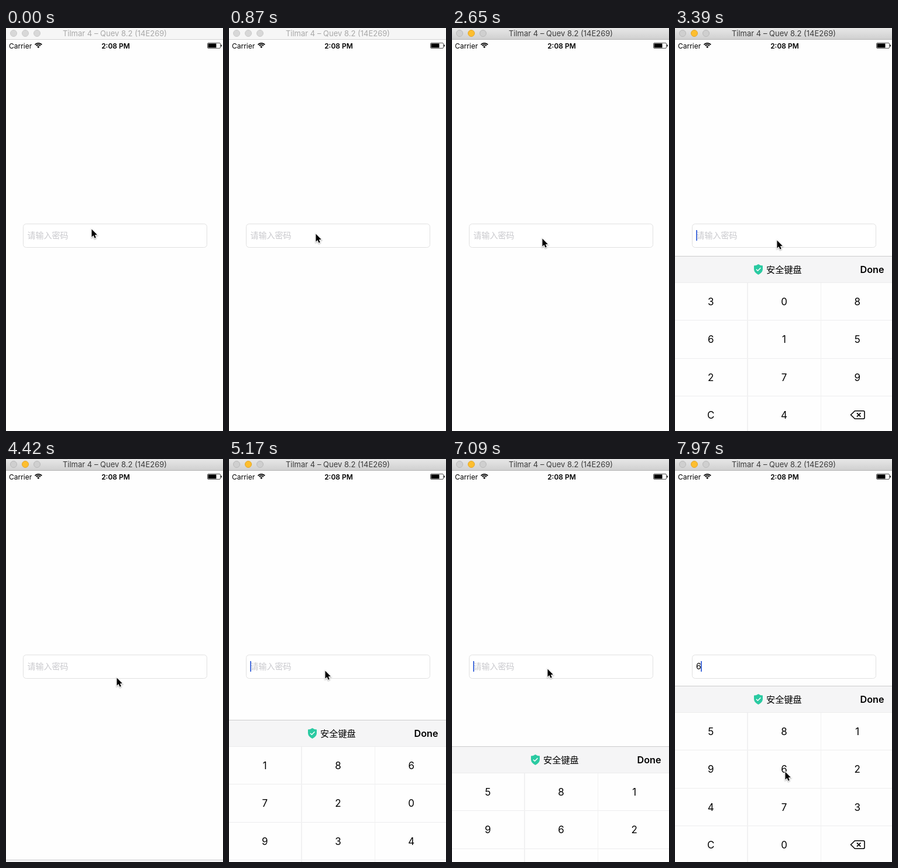
Write an HTML page with a canvas that moves like this. It is 371 by 686 pixels and loops after 8 s.

```html
<!DOCTYPE html>
<html lang="zh-CN">
<head>
<meta charset="utf-8">
<title>Secure keyboard</title>
<style>
html, body { margin: 0; width: 100%; height: 100%; overflow: hidden; background: #fefefe; }
canvas { display: block; width: 371px; height: 686px; }
</style>
</head>
<body>
<canvas></canvas>
<script>
const W = 371, H = 686, LOOP = 8000, TICK = 147.6;
const OPEN_TOP = 386, ROW = 64.3, ACTIVE_AT = 1164, TYPE_AT = 7815;
const FONT = 'Inter, "Noto Sans CJK SC", "Noto Sans CJK", sans-serif';

const canvas = document.querySelector('canvas');
const ctx = canvas.getContext('2d');
const dpr = window.devicePixelRatio || 1;
canvas.width = W * dpr;
canvas.height = H * dpr;

// Each showing of the keypad has its own shuffled digits.
const sessions = [
  { open: 1164, close: 2190, keys: '7965814032' },
  { open: 3000, close: 4078, keys: '3086152794' },
  { open: 5000, close: 5880, keys: '1867209345' },
  { open: 6962, close: Infinity, keys: '5819624730' }
];

// Pointer stops: time, x, y.
const stops = [
  [0, 146, 342], [300, 206, 297], [590, 114, 330], [880, 148, 350],
  [1476, 148, 350], [2100, 342, 412], [2210, 345, 414], [2657, 154, 358],
  [2960, 156, 356], [3260, 156, 356], [3960, 340, 412], [4078, 342, 413],
  [4428, 189, 372], [4576, 150, 358], [4723, 143, 354], [5020, 143, 354],
  [5756, 350, 417], [5900, 350, 417], [6785, 163, 357], [7085, 163, 357],
  [7700, 187, 529], [7970, 188, 532]
];

const mix = (a, b, p) => a + (b - a) * p;
const smooth = p => p * p * (3 - 2 * p);
const spring = ms => {
  const w = Math.max(0, ms) * 0.01826;
  return 1 - (1 + w) * Math.exp(-w);
};

function pointerAt(t) {
  const i = stops.findIndex(s => s[0] > t);
  if (i < 0) return stops[stops.length - 1].slice(1);
  const a = stops[i - 1], b = stops[i];
  const p = smooth((t - a[0]) / (b[0] - a[0]));
  return [mix(a[1], b[1], p), mix(a[2], b[2], p)];
}

function text(str, x, y, size, color = '#000', align = 'left', weight = 400) {
  ctx.font = `${weight} ${size}px ${FONT}`;
  ctx.textAlign = align;
  ctx.fillStyle = color;
  ctx.fillText(str, x, y);
}

function rect(x, y, w, h, color) {
  ctx.fillStyle = color;
  ctx.fillRect(x, y, w, h);
}

function disc(x, y, r, fill, stroke) {
  ctx.beginPath();
  ctx.arc(x, y, r, 0, Math.PI * 2);
  ctx.fillStyle = fill;
  ctx.fill();
  if (stroke) line(stroke, 1);
}

function line(color, width) {
  ctx.strokeStyle = color;
  ctx.lineWidth = width;
  ctx.stroke();
}

function poly(points, closed) {
  ctx.beginPath();
  points.forEach(([x, y]) => ctx.lineTo(x, y));
  if (closed) ctx.closePath();
}

function titleBar(active) {
  const g = ctx.createLinearGradient(0, 0, 0, 19);
  g.addColorStop(0, active ? '#e7e7e7' : '#f6f6f6');
  g.addColorStop(1, active ? '#d0d0d0' : '#f6f6f6');
  rect(0, 0, W, 19, g);
  rect(0, 19, W, 1, active ? '#b4b4b4' : '#d3d3d3');
  [13, 33, 53].forEach((x, i) => {
    const lit = active && i === 1;
    const idle = active ? '#cfcfcf' : '#d8d8d8';
    disc(x, 9, 5.5, lit ? '#fdbe2e' : idle, lit ? '#e2a62a' : active ? '#b9b9b9' : '#cbcbcb');
  });
  text('Tilmar 4 – Quev 8.2 (14E269)', 186, 14, 13, active ? '#3b3b3b' : '#a8a8a8', 'center');
}

function statusBar() {
  text('Carrier', 5, 34.5, 12);
  text('2:08 PM', 187.5, 34.5, 12, '#000', 'center', 600);
  ctx.lineCap = 'butt';
  [7.8, 5].forEach(r => {
    ctx.beginPath();
    ctx.arc(55.3, 33.6, r, -Math.PI * 0.77, -Math.PI * 0.23);
    line('#000', 1.7);
  });
  ctx.beginPath();
  ctx.moveTo(55.3, 34.3);
  ctx.arc(55.3, 33.6, 2.6, -Math.PI * 0.8, -Math.PI * 0.2);
  ctx.fillStyle = '#000';
  ctx.fill();
  ctx.beginPath();
  ctx.roundRect(344.5, 25.5, 22, 9, 1.5);
  line('#555', 1);
  rect(345.5, 26.5, 14, 7, '#000');
  rect(367.5, 28.5, 1.5, 3, '#000');
}

function field(typed, caret) {
  ctx.beginPath();
  ctx.roundRect(29.5, 333.5, 314, 40, 5);
  ctx.fillStyle = '#fff';
  ctx.fill();
  line('#e1e1e1', 1);
  if (typed) text('6', 36, 358, 14);
  else text('请输入密码', 36.5, 358, 14, '#c9c9cd');
  if (caret) rect(typed ? 44 : 36, 344, 2, 18, '#4a70dc');
}

function shield(x, y) {
  ctx.beginPath();
  ctx.moveTo(x, y);
  ctx.quadraticCurveTo(x + 3.5, y + 2.6, x + 7.5, y + 2.6);
  ctx.lineTo(x + 7.5, y + 9);
  ctx.quadraticCurveTo(x + 7, y + 14.5, x, y + 18);
  ctx.quadraticCurveTo(x - 7, y + 14.5, x - 7.5, y + 9);
  ctx.lineTo(x - 7.5, y + 2.6);
  ctx.quadraticCurveTo(x - 3.5, y + 2.6, x, y);
  ctx.fillStyle = '#2bcaa2';
  ctx.fill();
  poly([[x - 3.6, y + 8.8], [x - 1, y + 11.3], [x + 4, y + 6.2]]);
  line('#fff', 1.5);
}

function backspace(x, y) {
  ctx.lineJoin = 'round';
  ctx.beginPath();
  ctx.moveTo(x - 11.5, y);
  ctx.lineTo(x - 4.5, y - 6.8);
  ctx.lineTo(x + 10, y - 6.8);
  ctx.quadraticCurveTo(x + 12, y - 6.8, x + 12, y - 4.8);
  ctx.lineTo(x + 12, y + 4.8);
  ctx.quadraticCurveTo(x + 12, y + 6.8, x + 10, y + 6.8);
  ctx.lineTo(x - 4.5, y + 6.8);
  ctx.closePath();
  line('#000', 1.6);
  poly([[x - 1, y - 3.2], [x + 5.4, y + 3.2]]);
  line('#000', 1.7);
  poly([[x + 5.4, y - 3.2], [x - 1, y + 3.2]]);
  line('#000', 1.7);
  ctx.lineJoin = 'miter';
}

function keypad(top, digits) {
  rect(0, top, W, H - top, '#fefefe');
  rect(0, top, W, 46, '#f5f5f6');
  rect(0, top, W, 1, '#cbcbcd');
  rect(0, top + 45, W, 1, '#ececed');
  shield(142.5, top + 14);
  text('安全键盘', 156, top + 28.8, 15.2);
  text('Done', 357.5, top + 29, 16.2, '#000', 'right', 600);
  for (let r = 1; r < 4; r++) rect(0, Math.round(top + 45 + r * ROW), W, 1, '#ededee');
  rect(123, top + 46, 2, H, '#f1f1f2');
  rect(249, top + 46, 1, H, '#f1f1f2');
  const keys = [...digits.slice(0, 9), 'C', digits[9]];
  keys.forEach((key, i) => {
    const x = 61.3 + (i % 3) * 125.2, y = top + 78 + Math.floor(i / 3) * ROW;
    text(key, x, y + 6, 17, '#000', 'center');
  });
  backspace(312, top + 270.5);
}

function pointer(x, y) {
  ctx.save();
  ctx.translate(x, y);
  poly([[0.5, 0.5], [0.5, 13.8], [3.5, 11], [5.6, 15.8], [7.8, 14.8], [5.8, 10.2], [9.9, 10]], true);
  ctx.shadowColor = 'rgba(0,0,0,.35)';
  ctx.shadowBlur = 2 * dpr;
  ctx.shadowOffsetY = dpr;
  line('#fff', 2);
  ctx.shadowColor = 'transparent';
  ctx.fillStyle = '#000';
  ctx.fill();
  ctx.restore();
}

function draw(t) {
  ctx.setTransform(dpr, 0, 0, dpr, 0, 0);
  rect(0, 0, W, H, '#fefefe');
  const s = sessions.filter(q => q.open <= t).pop();
  const typed = t >= TYPE_AT;
  let caret = false, shown = 0;
  if (s) {
    const focused = t < s.close;
    caret = focused && (t - (typed ? TYPE_AT : s.open)) % 1060 < 640;
    shown = focused ? spring(t - s.open) : 1 - spring(t - s.close);
  }
  titleBar(t >= ACTIVE_AT);
  statusBar();
  field(typed, caret);
  if (shown > 0.005) keypad(Math.round(mix(H, OPEN_TOP, shown)), s.keys);
  pointer(...pointerAt(t).map(Math.round));
}

const start = performance.now();
function frame() {
  const t = (performance.now() - start) % LOOP;
  draw(Math.floor((t + 16) / TICK) * TICK);
  requestAnimationFrame(frame);
}
frame();
</script>
</body>
</html>
```
